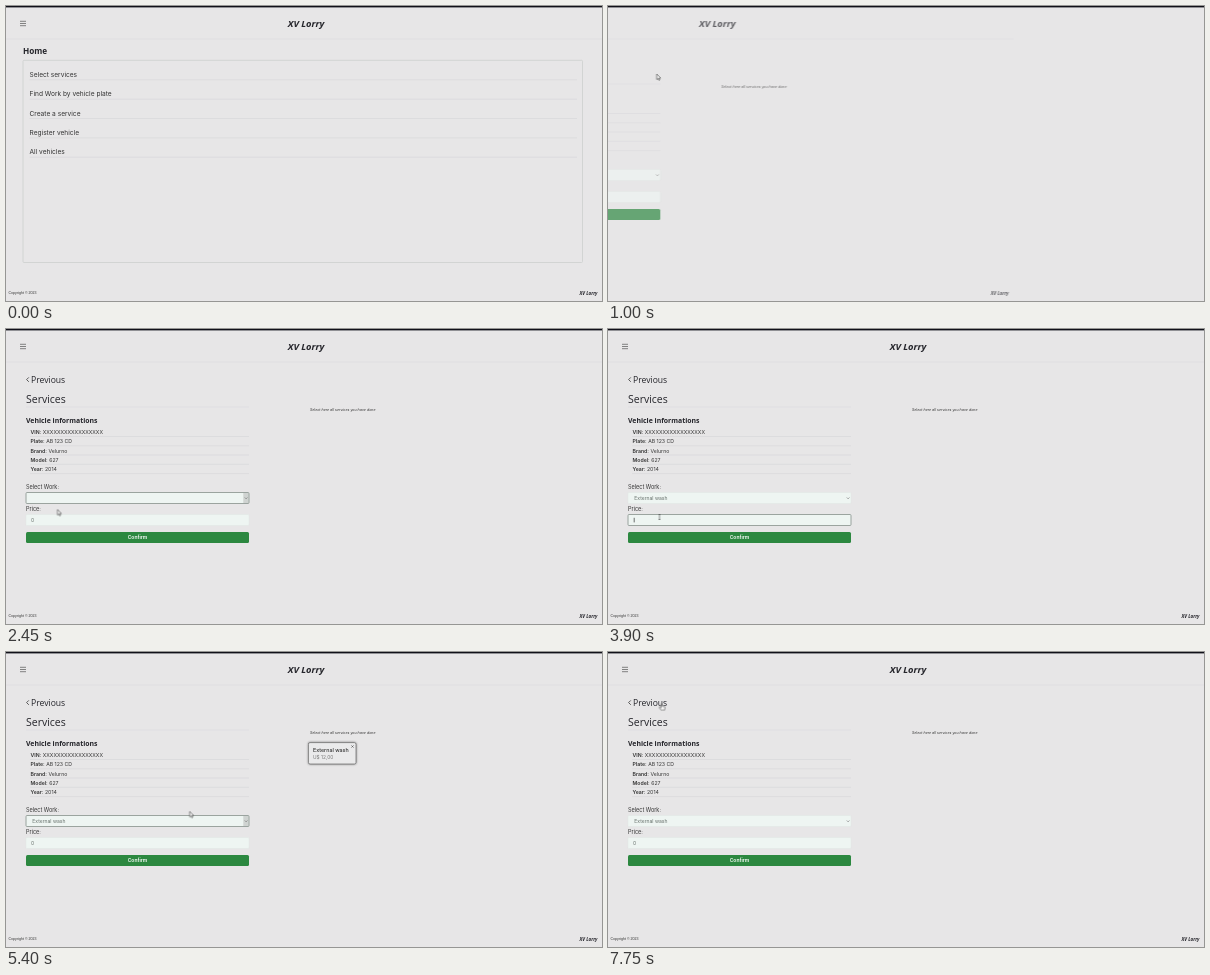
Write an HTML page that moves like this. It is 596 px wide and 295 px high and loops after 8 s.

```html
<!DOCTYPE html>
<html lang="en">
<head>
<meta charset="utf-8">
<title>Vehicle services</title>
<style>
html, body { margin: 0; width: 100%; height: 100%; overflow: hidden; background: #e7e6e7; }
svg { display: block; width: 100%; height: 100%; }
text { font-family: Inter, sans-serif; fill: #333; white-space: pre; }
.brand, .head { font-family: "Open Sans", "Noto Sans", sans-serif; font-weight: 600; fill: #25252b; }
.brand { font-style: italic; font-weight: 700; }
.menu { font-size: 6.6px; }
.row { font-size: 5.2px; }
.row tspan { font-weight: 600; }
.label { font-size: 5.5px; }
.value { font-size: 5px; fill: #66706b; }
.line { stroke: #d6d6d8; stroke-width: .6; }
.field { fill: #eef5f2; stroke: #dfe5e2; stroke-width: .4; }
.focus { fill: none; stroke: #88928d; stroke-width: .8; }
.pointer path { fill: #f6f6f6; stroke: #444; stroke-width: .6; stroke-linejoin: round; }

/* 1% of the loop is 80 ms */
.move, .flip { animation: 8s linear infinite; }
.flip { animation-timing-function: step-end; }

#home { animation-name: leave; }
@keyframes leave {
  0%, 2% { transform: none; opacity: 1; }
  5.875%, 100% { transform: translateX(596px); opacity: 0; }
}
#services { animation-name: enter; }
@keyframes enter {
  0%, 7.125% { transform: translateX(-596px); opacity: 0; }
  12.5% { transform: translateX(-192px); opacity: .69; }
  14.375%, 100% { transform: none; opacity: 1; }
}
#pointer { animation-name: travel; }
@keyframes travel {
  0%, 16.25% { transform: translate(48.7px, 68px); }
  23.75% { transform: translate(51px, 168px); }
  25.6%, 26.9% { transform: translate(51px, 171px); }
  30%, 30.7% { transform: translate(51.5px, 180.5px); }
  32.5%, 34.4% { transform: translate(51.5px, 186px); }
  35.6%, 52.5% { transform: translate(51.5px, 188px); }
  55.6%, 60% { transform: translate(60px, 208px); }
  67.5% { transform: translate(183.3px, 159.5px); }
  68.75% { transform: translate(222px, 151px); }
  73.75%, 88.1% { transform: translate(348px, 94px); }
  93.75%, 94.4% { transform: translate(80px, 64px); }
  96.9%, 100% { transform: translate(53.5px, 51.5px); }
}
#arrow { animation-name: arrow; }
@keyframes arrow {
  0%, 38.75%, 73.1%, 95% { opacity: 0; }
  2.5%, 60.6%, 88.2% { opacity: 1; }
  100% { opacity: 0; }
}
#beam { animation-name: beam; }
@keyframes beam { 0%, 53.1%, 100% { opacity: 0; } 38.75% { opacity: 1; } }
#hand { animation-name: hand; }
@keyframes hand {
  0%, 60.6%, 88.2% { opacity: 0; }
  53.1%, 73.1%, 95%, 100% { opacity: 1; }
}
#selectFocus { animation-name: selectFocus; }
@keyframes selectFocus {
  0%, 40%, 68.1%, 100% { opacity: 0; }
  22.5%, 65% { opacity: 1; }
}
#picked { animation-name: picked; }
@keyframes picked { 0% { opacity: 0; } 39.3%, 100% { opacity: 1; } }
#priceFocus { animation-name: priceFocus; }
@keyframes priceFocus { 0%, 59.3%, 100% { opacity: 0; } 43.1% { opacity: 1; } }
#zero { animation-name: zero; }
@keyframes zero { 0%, 59.3%, 100% { opacity: 1; } 48.7% { opacity: 0; } }
#one { animation-name: one; }
@keyframes one { 0%, 59.3%, 100% { opacity: 0; } 50.6% { opacity: 1; } }
#two { animation-name: two; }
@keyframes two { 0%, 59.3%, 100% { opacity: 0; } 52.5% { opacity: 1; } }
#caret { animation-name: caret; }
@keyframes caret {
  0%, 100% { transform: none; opacity: 0; }
  48.7% { transform: none; opacity: 1; }
  50.6% { transform: translateX(2px); opacity: 1; }
  52.5% { transform: translateX(5px); opacity: 1; }
  54.5% { transform: none; opacity: 0; }
}
#card { animation-name: card; filter: drop-shadow(.5px .8px .8px #0007); }
@keyframes card {
  0%, 59.3% { transform: none; opacity: 0; }
  63%, 83.7% { transform: none; opacity: 1; }
  86.8%, 87.4% { transform: translateX(1px); opacity: .95; }
  88.1%, 100% { transform: translateX(1px); opacity: 0; }
}
#cardText { animation-name: cardText; }
@keyframes cardText {
  0%, 59.3% { transform: none; opacity: 0; }
  63%, 83.7% { transform: none; opacity: 1; }
  86.875% { transform: translateX(14.6px); opacity: .22; }
  88.1%, 100% { transform: translateX(15px); opacity: 0; }
}
</style>
</head>
<body>
<svg viewBox="0 0 596 295" preserveAspectRatio="none">
  <defs>
    <g id="frame">
      <path d="M14 15.3h6M14 17.5h6M14 19.7h6" stroke="#555" stroke-width=".7"/>
      <text class="brand" x="300" y="21" font-size="9.3" text-anchor="middle">XV Lorry</text>
      <path class="line" d="M0 33h596" opacity=".7"/>
      <text x="2.5" y="288.4" font-size="3.6" style="font-family:'Liberation Sans',sans-serif">Copyright © 2023</text>
      <text class="brand" x="591.5" y="289" font-size="4.6" text-anchor="end">XV Lorry</text>
    </g>
  </defs>

  <g id="home" class="move">
    <use href="#frame"/>
    <text class="head" x="17" y="48.4" font-size="8.2" style="font-weight:700">Home</text>
    <rect x="17" y="54.3" width="559.5" height="202.2" rx="1" fill="none" stroke="#cdd0ce" stroke-width=".8"/>
    <path class="line" d="M23.5 73.8h547.5M23.5 93.2h547.5M23.5 112.5h547.5M23.5 131.9h547.5M23.5 151.2h547.5"/>
    <g class="menu">
      <text x="23.5" y="70.8">Select services</text>
      <text x="23.5" y="90.2">Find Work by vehicle plate</text>
      <text x="23.5" y="109.6">Create a service</text>
      <text x="23.5" y="129">Register vehicle</text>
      <text x="23.5" y="148.4">All vehicles</text>
    </g>
  </g>

  <g id="services" class="move">
    <use href="#frame"/>
    <path d="M22.8 48.4l-2.2 2.2 2.2 2.2" fill="none" stroke="#333" stroke-width=".8"/>
    <text class="head" x="25" y="53.7" font-size="8.6" style="font-weight:400">Previous</text>
    <text class="head" x="20" y="73.6" font-size="10.5" style="font-weight:500">Services</text>
    <path class="line" d="M20 78h223" opacity=".6"/>
    <text class="head" x="20" y="94.4" font-size="6.9" style="font-weight:700">Vehicle informations</text>
    <g class="row">
      <text x="24.5" y="105.1"><tspan>VIN:</tspan> XXXXXXXXXXXXXXXXX</text>
      <text x="24.5" y="114.4"><tspan>Plate:</tspan> AB 123 CD</text>
      <text x="24.5" y="123.7"><tspan>Brand:</tspan> Velurno</text>
      <text x="24.5" y="133"><tspan>Model:</tspan> 627</text>
      <text x="24.5" y="142.3"><tspan>Year:</tspan> 2014</text>
    </g>
    <path class="line" d="M24 107.5h219M24 116.8h219M24 126h219M24 135.3h219M24 144.6h219"/>

    <text class="label" x="20" y="160.2">Select Work:</text>
    <rect class="field" x="20" y="163.5" width="223" height="11" rx="1"/>
    <g id="selectFocus" class="flip">
      <rect x="237.3" y="163.8" width="5.4" height="10.4" fill="#cfd3d1"/>
      <rect class="focus" x="20" y="163.5" width="223" height="11" rx="1"/>
    </g>
    <path d="M238.8 168.5l1.3 1.3 1.3-1.3" fill="none" stroke="#666" stroke-width=".6"/>
    <text id="picked" class="value flip" x="26.3" y="171">External wash</text>

    <text class="label" x="20" y="182.2">Price:</text>
    <rect class="field" x="20" y="185.5" width="223" height="11" rx="1"/>
    <rect id="priceFocus" class="focus flip" x="20" y="185.5" width="223" height="11" rx="1"/>
    <text id="zero" class="value flip" x="25" y="192.9">0</text>
    <text id="one" class="value flip" x="25" y="192.9">1</text>
    <text id="two" class="value flip" x="27.4" y="192.9">2</text>
    <path id="caret" class="flip" d="M26.2 188.8v4.6" stroke="#333" stroke-width=".7"/>

    <rect x="20" y="203" width="223" height="11" rx="1.5" fill="#2c8840"/>
    <text x="131.5" y="210.3" font-size="5" font-weight="600" text-anchor="middle" style="fill:#fff">Confirm</text>

    <text x="304" y="82.4" font-size="3.6" font-style="italic">Select here all services you have done</text>

    <rect id="card" class="move" x="302.4" y="90.6" width="47.6" height="21.4" rx="1.6" fill="#eaeaeb" stroke="#666" stroke-width=".7"/>
    <g id="cardText" class="move">
      <text x="307" y="99.6" font-size="5.3" font-weight="500">External wash</text>
      <text x="307" y="107.2" font-size="4.8" style="fill:#777">U$ 12,00</text>
      <path d="M345.4 93.4l2.2 2.2m0-2.2l-2.2 2.2" stroke="#444" stroke-width=".6"/>
    </g>
  </g>

  <rect width="596" height="1.4" fill="#111119"/>

  <g id="pointer" class="pointer move">
    <path id="arrow" class="flip" d="M0 0v5.6l1.3-1.2.9 2 .9-.4-.9-1.9h1.8z"/>
    <path id="beam" class="flip" d="M-1 -2.6h2M0 -2.6v5.2M-1 2.6h2"/>
    <path id="hand" class="flip" d="M-.6 .4q.6-.8 1.2 0v2.2l2.3.5q.6.2.5 1l-.5 2.6h-3.3l-2-2.6q0-.8.8-.6l1 .7z"/>
  </g>
</svg>
</body>
</html>
```
